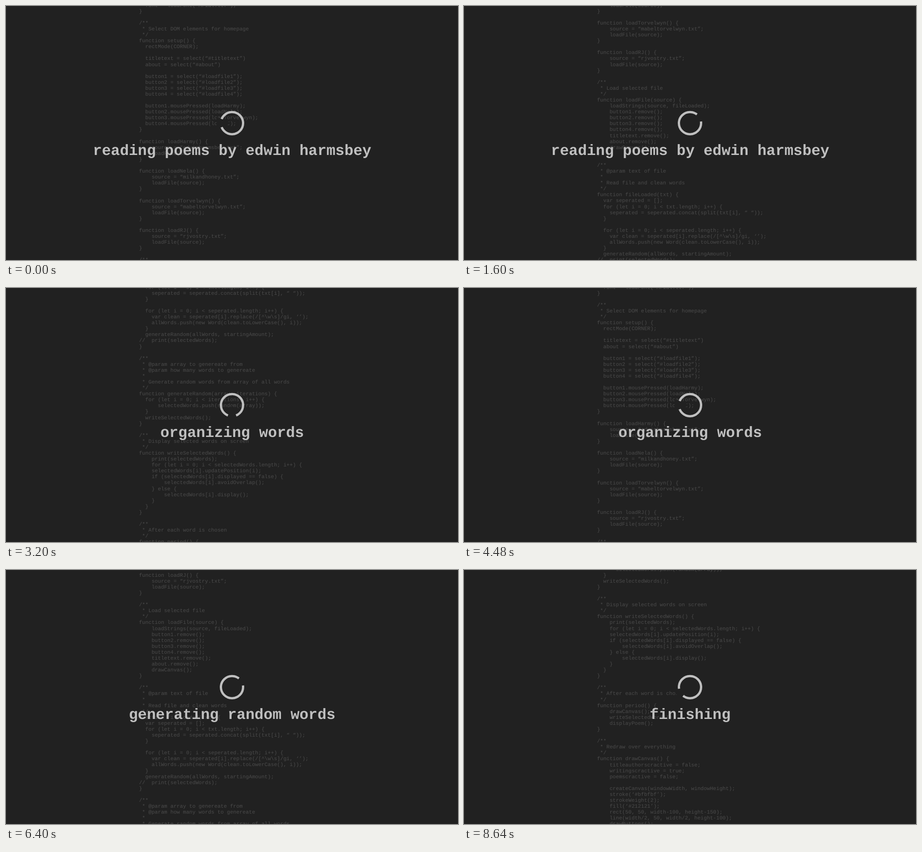
Write an HTML page that moves like this. It is 998x561 px and loops after 8960 ms.

```html
<!DOCTYPE html>
<html lang="en">
<head>
<meta charset="utf-8">
<title>Loading</title>
<style>
  html, body { margin: 0; width: 100%; height: 100%; overflow: hidden; background: #212121; }
  svg { display: block; width: 998px; height: 561px; }
  text {
    font-family: "Liberation Mono", "Noto Sans Mono", monospace;
    white-space: pre;
    text-rendering: geometricPrecision;
  }
  #code { font-size: 11.55px; fill: #4b4b4b; }
  #title { font-size: 33.05px; font-weight: bold; fill: #bfbfbf; text-anchor: middle; }
</style>
</head>
<body>
<svg viewBox="0 0 998 561">
  <rect width="998" height="561" fill="#212121"/>
  <g id="code"></g>
  <circle cx="499" cy="258.7" r="24.5" fill="none" stroke="#bfbfbf" stroke-width="5"/>
  <path id="notch" d="M0 0L34 -13.4V13.4Z" fill="#212121"/>
  <text id="title" x="499.3" y="329"></text>
</svg>
<script>
const source = String.raw`  font = loadFont(“Arial.ttf”);
}

/**
 * Select DOM elements for homepage
 */
function setup() {
  rectMode(CORNER);

  titletext = select(“#titletext”)
  about = select(“#about”)

  button1 = select(“#loadfile1”);
  button2 = select(“#loadfile2”);
  button3 = select(“#loadfile3”);
  button4 = select(“#loadfile4”);

  button1.mousePressed(loadHarmy);
  button2.mousePressed(loadNela);
  button3.mousePressed(loadTorvelwyn);
  button4.mousePressed(loadRJ);
}

function loadHarmy() {
    source = “edwinharmsbey.txt”;
    loadFile(source);
}

function loadNela() {
    source = “milkandhoney.txt”;
    loadFile(source);
}

function loadTorvelwyn() {
    source = “mabeltorvelwyn.txt”;
    loadFile(source);
}

function loadRJ() {
    source = “rjvostry.txt”;
    loadFile(source);
}

/**
 * Load selected file
 */
function loadFile(source) {
    loadStrings(source, fileLoaded);
    button1.remove();
    button2.remove();
    button3.remove();
    button4.remove();
    titletext.remove();
    about.remove();
    drawCanvas();
}

/**
 * @param text of file
 *
 * Read file and clean words
 */
function fileLoaded(txt) {
  var seperated = [];
  for (let i = 0; i < txt.length; i++) {
    seperated = seperated.concat(split(txt[i], “ “));
  }

  for (let i = 0; i < seperated.length; i++) {
    var clean = seperated[i].replace(/[^\w\s]/gi, ‘’);
    allWords.push(new Word(clean.toLowerCase(), i));
  }
  generateRandom(allWords, startingAmount);
//  print(selectedWords);
}

/**
 * @param array to genereate from
 * @param how many words to genereate
 *
 * Generate random words from array of all words
 */
function generateRandom(array, iterations) {
  for (let i = 0; i < iterations; i++) {
      selectedWords.push(random(array));
  }
  writeSelectedWords();
}

/**
 * Display selected words on screen
 */
function writeSelectedWords() {
    print(selectedWords);
    for (let i = 0; i < selectedWords.length; i++) {
    selectedWords[i].updatePosition(i);
    if (selectedWords[i].displayed == false) {
        selectedWords[i].avoidOverlap();
    } else {
        selectedWords[i].display();
    }
  }
}

/**
 * After each word is chosen
 */
function period() {
    drawCanvas();
    writeSelectedWords();
    displayPoem();
}

/**
 * Redraw over everything
 */
function drawCanvas() {
    titleauthorscractive = false;
    writingscractive = true;
    poemscractive = false;

    createCanvas(windowWidth, windowHeight);
    stroke(‘#bfbfbf’);
    strokeWeight(2);
    fill(‘#212121’);
    rect(50, 50, width-100, height-150);
    line(width/2, 50, width/2, height-100);
    drawButtons();`;

const TICK = 320, TICKS = 28, SCROLL_TICKS = 14, LINE = 13.085;
const titles = [
  [0, "reading poems by edwin harmsbey"],
  [8, "organizing words"],
  [15, "generating random words"],
  [22, "finishing"],
];

const [code, notch, title] = ["code", "notch", "title"].map(id => document.getElementById(id));

source.split("\n").forEach((line, i) => {
  const row = document.createElementNS("http://www.w3.org/2000/svg", "text");
  row.setAttribute("x", 293.7);
  row.setAttribute("y", (1.7 + i * LINE).toFixed(2));
  row.textContent = line;
  code.append(row);
});

function draw(tick) {
  const k = tick % SCROLL_TICKS;
  // The listing waits briefly, then moves by whole lines.
  const lines = Math.max(0, Math.round(k * 20 / 3 - 3));
  // The notch turns once per listing, in twelfths.
  const turn = 180 + 30 * Math.round(k * 12 / SCROLL_TICKS + 0.29);
  code.setAttribute("transform", `translate(0 ${-lines * LINE})`);
  notch.setAttribute("transform", `translate(499 258.7) rotate(${turn})`);
  title.textContent = titles.findLast(([start]) => tick >= start)[1];
}

let last = -1;
function loop() {
  const tick = Math.floor(performance.now() / TICK) % TICKS;
  if (tick !== last) draw(last = tick);
  requestAnimationFrame(loop);
}
loop();
</script>
</body>
</html>
```
